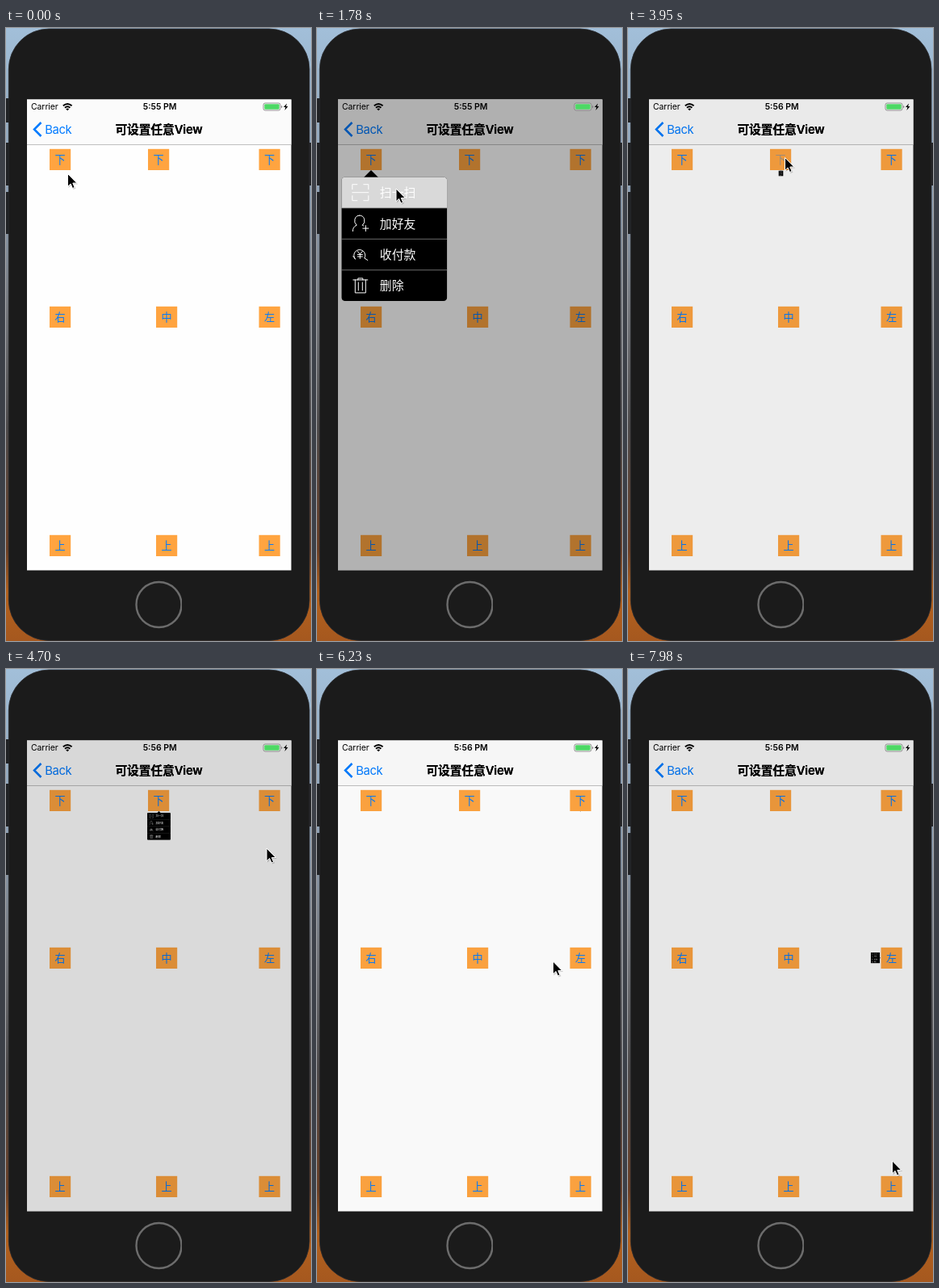
Animation of 378 by 759 pixels, one loop 8 s. Source, as an HTML page:

```html
<!DOCTYPE html>
<html lang="zh">
<head>
<meta charset="utf-8">
<title>Popover menu</title>
<style>
  html, body { margin: 0; width: 100%; height: 100%; overflow: hidden; }
  svg { display: block; width: 378px; height: 759px; }
  text { font-family: Inter, "Noto Sans CJK SC", "Noto Sans CJK", sans-serif; white-space: pre; }
  .han { font-family: "Noto Sans CJK SC", "Noto Sans CJK", sans-serif; text-anchor: middle; }
  .line { fill: none; stroke: #fff; stroke-width: 1; stroke-linecap: round; }
</style>
</head>
<body>
<svg id="stage" viewBox="0 0 378 759" xmlns="http://www.w3.org/2000/svg"></svg>
<script>
const LOOP = 8000, STEP = 59, LEAD = 20;
const BOX_W = 131, BOX_H = 153.6, ROW = BOX_H / 4;

const buttons = [
  [54, 150, '下'], [176, 150, '下'], [313.5, 150, '下'],
  [54, 345, '右'], [186, 345, '中'], [313.5, 345, '左'],
  [54, 628, '上'], [186, 628, '上'], [313.5, 628, '上'],
];

// Menus: tip of the arrow, corner of the box, owning button and timing in ms.
const menus = [
  { tip: [67, 176], box: [30.3, 184.5], button: 0, press: 290, open: 400, close: 3230 },
  { tip: [189.5, 176], box: [124, 184.5], button: 1, press: 3825, open: 3863, close: 4564 },
  { tip: [326.5, 176], box: [218.3, 184.5], button: 2, press: 4925, open: 4975, close: 5944 },
  { tip: [313, 357.7], box: [173.5, 280.9], button: 5, press: 6780, open: 6983, close: 7773, side: true },
];
const MENU_TIME = 300, RELEASE_TIME = 470;

const taps = [
  { row: 0, on: 1410, off: 1770, end: 2070 },
  { row: 1, on: 2240, off: 2420, end: 2760 },
];

// Pointer stops: time, x, y.
const path = [
  [0, 76.5, 180.5], [118, 61, 166], [590, 61, 166], [1060, 98, 199],
  [1770, 98, 199], [2070, 100, 237], [2660, 100, 237], [3010, 235, 282],
  [3290, 235, 282], [3645, 194.5, 160.5], [4130, 194.5, 160.5], [4560, 323, 222],
  [4730, 323, 222], [4910, 327, 163], [5160, 327, 163], [5451, 318, 280],
  [5605, 296.5, 341], [5800, 292.5, 362], [6240, 292.5, 362], [6740, 325.5, 370],
  [7150, 325.5, 370], [7440, 327.5, 609],
];

const clamp = v => Math.min(1, Math.max(0, v));
const ease = v => { v = clamp(v); return v * v * (3 - 2 * v); };

const icons = [
  'M-10-4V-10H-4M4-10H10V-4M-10 4V10H-4M4 10H10V4M-10 0H10',
  'M-1-10a6 6.6 0 0 1 3.6 12M-1-10a6 6.6 0 0 0-3.6 12C-8 3.500-9.500 6-9.500 9.500M2.600 2L4 3M3 6H10M6.500 2.500V9.500',
  'M-6.500 5.500A7 7 0 1 1 5 4.500L9 7M-3.500-4L-.5-.5L2.500-4M-.5-.5V5M-3.500 0H2.500M-3.500 2.500H2.500M-9 2L-6.500 5.500',
  'M-9-7H9M-3-7V-9H3V-7M-6.500-7V9H6.500V-7M-2.500-4V6M2.500-4V6',
];
const labels = ['扫一扫', '加好友', '收付款', '删除'];

const rowMarkup = (label, i) => {
  const y = i * ROW;
  return `<rect class="hit" y="${y}" width="${BOX_W}" height="${ROW}" fill="#d9d9d9" opacity="0"/>
    <path class="line" d="${icons[i]}" transform="translate(23.500 ${y + ROW / 2})"/>
    <text class="han" style="text-anchor:start" x="47.500" y="${y + 24.7}" font-size="14.850" fill="#fff">${label}</text>
    ${i ? `<path d="M0 ${y}H${BOX_W}" stroke="#999" stroke-width=".7"/>` : ''}`;
};

const menuMarkup = ({ tip: [x, y], box: [bx, by], side }) => {
  const arrow = side ? `M${x} ${y}l-9-9v18z` : `M${x} ${y}l-9 9h18z`;
  return `<g class="menu"><path d="${arrow}"/>
    <g transform="translate(${bx} ${by})"><g clip-path="url(#round)">
      <rect width="${BOX_W}" height="${BOX_H}"/>${labels.map(rowMarkup).join('')}
    </g></g></g>`;
};

const buttonMarkup = ([x, y, label]) =>
  `<rect x="${x}" y="${y - .2}" width="26.200" height="26.200" fill="#ffa440"/>
   <text class="han key" x="${x + 13.1}" y="${y + 17.9}" font-size="13.100" fill="#007aff">${label}</text>`;

const sideKey = (x, y, h) => `<rect x="${x}" y="${y}" width="4" height="${h}" fill="#202124"/>`;

document.getElementById('stage').innerHTML = `
  <defs>
    <linearGradient id="sky" x2="0" y2="1">
      <stop stop-color="#a2bfd9"/><stop offset=".28" stop-color="#8fa1b5"/>
      <stop offset=".45" stop-color="#777a80"/><stop offset=".65" stop-color="#4d4a4b"/>
      <stop offset=".85" stop-color="#6b3f26"/><stop offset=".92" stop-color="#b5621d"/>
      <stop offset="1" stop-color="#a5581f"/>
    </linearGradient>
    <clipPath id="round"><rect width="${BOX_W}" height="${BOX_H}" rx="4.500"/></clipPath>
    <clipPath id="home"><rect x="160" y="684" width="58" height="60"/></clipPath>
    <clipPath id="screen"><rect x="26" y="88.500" width="327.500" height="583"/></clipPath>
  </defs>
  <rect width="378" height="759" fill="url(#sky)"/>
  ${sideKey(0, 87, 30)}${sideKey(0, 142, 53)}${sideKey(0, 203, 52)}${sideKey(375, 142, 53)}
  <rect x="3.300" y="1" width="372.700" height="757.500" rx="50" fill="#1b1b1b" stroke="#2b2d30" stroke-width=".8"/>
  <circle cx="189.500" cy="714" r="28" fill="none" stroke="#6c6c6c" stroke-width="2.400" clip-path="url(#home)"/>
  <g clip-path="url(#screen)">
    <rect x="26" y="88" width="328" height="584" fill="#fefefe"/>
    <rect x="26" y="88" width="328" height="56" fill="#fbfbfb"/>
    <path d="M26 144.500H354" stroke="#b8b8b8" stroke-width=".9"/>
    <path d="M43.500 117L35 125.500L43.500 134" fill="none" stroke="#007aff" stroke-width="2.500"/>
    <text x="48.300" y="130.700" font-size="14.850" letter-spacing="-.4" fill="#007aff">Back</text>
    <text x="189.500" y="130.700" font-size="14.850" font-weight="600" letter-spacing="-.2" text-anchor="middle">可设置任意View</text>
    ${buttons.map(buttonMarkup).join('')}
    <rect id="shade" x="26" y="88" width="328" height="584" opacity="0"/>
    <text x="189.500" y="130.700" font-size="14.850" font-weight="600" letter-spacing="-.2" text-anchor="middle">可设置任意View</text>
    <text x="31" y="101.300" font-size="10.500" letter-spacing="-.1">Carrier</text>
    <text id="clock" x="190.700" y="101.300" font-size="10.500" font-weight="600" text-anchor="middle"></text>
    <g fill="none" stroke="#000" stroke-width="1.900">
      <path d="M70.800 96.300Q76.200 91.500 81.600 96.300M73 98.700Q76.200 95.900 79.400 98.700"/>
    </g>
    <path d="M76.200 102.300l-2-2.100q2-1.600 4 0z"/>
    <rect x="319" y="93" width="21" height="9" rx="2.200" fill="#fff" fill-opacity=".35" stroke="#777" stroke-width=".8"/>
    <rect x="320.300" y="94.200" width="18.400" height="6.600" rx="1" fill="#4cd964"/>
    <path d="M341.200 96v3q1.200-.5 1.200-1.500t-1.200-1.500z" fill="#777"/>
    <path d="M348 93.500l-4 4.600h2.400l-1 3.900l4.100-5h-2.400z"/>
    ${menus.map(menuMarkup).join('')}
  </g>
  <g id="pointer">
    <path d="M1 1.500V17.500L4.700 14L7 19.500L10 18.200L7.700 13H12.700z" fill="#000" opacity=".18"/>
    <path d="M0 0V15.800L3.600 12.400L6 18L8.600 16.900L6.300 11.500H11.300z" fill="#000" stroke="#fff" stroke-width="1"/>
  </g>`;

const all = selector => [...document.querySelectorAll(selector)];
const [shade, clock, pointer] = ['shade', 'clock', 'pointer'].map(id => document.getElementById(id));
const keys = all('.key');
const menuNodes = all('.menu');
const hits = [...menuNodes[0].querySelectorAll('.hit')];

function pointerAt(t) {
  const next = path.findIndex(stop => stop[0] > t);
  if (next < 0) return path[path.length - 1].slice(1);
  const [t0, x0, y0] = path[next - 1], [t1, x1, y1] = path[next];
  const k = (t - t0) / (t1 - t0);
  return [x0 + (x1 - x0) * k, y0 + (y1 - y0) * k];
}

function render(t) {
  let shown = 0;
  menus.forEach(({ tip: [x, y], button, press, open, close }, i) => {
    const p = ease((t - open) / MENU_TIME) - ease((t - close) / MENU_TIME);
    shown = Math.max(shown, p);
    menuNodes[i].style.display = p > 0 ? '' : 'none';
    menuNodes[i].setAttribute('transform',
      `translate(${x} ${y}) scale(${p * p}) translate(${-x} ${-y})`);
    keys[button].setAttribute('opacity',
      t < press ? 1 : .2 + .8 * clamp((t - open) / RELEASE_TIME));
  });
  shade.setAttribute('opacity', .3 * shown);
  for (const { row, on, off, end } of taps)
    hits[row].setAttribute('opacity', t < on ? 0 : 1 - clamp((t - off) / (end - off)));
  clock.textContent = t < 1880 ? '5:55 PM' : '5:56 PM';
  pointer.setAttribute('transform', `translate(${pointerAt(t)})`);
}

const start = performance.now();
function tick() {
  const t = (performance.now() - start) % LOOP;
  render(Math.floor((t + LEAD) / STEP) * STEP);
  requestAnimationFrame(tick);
}
tick();
</script>
</body>
</html>
```
